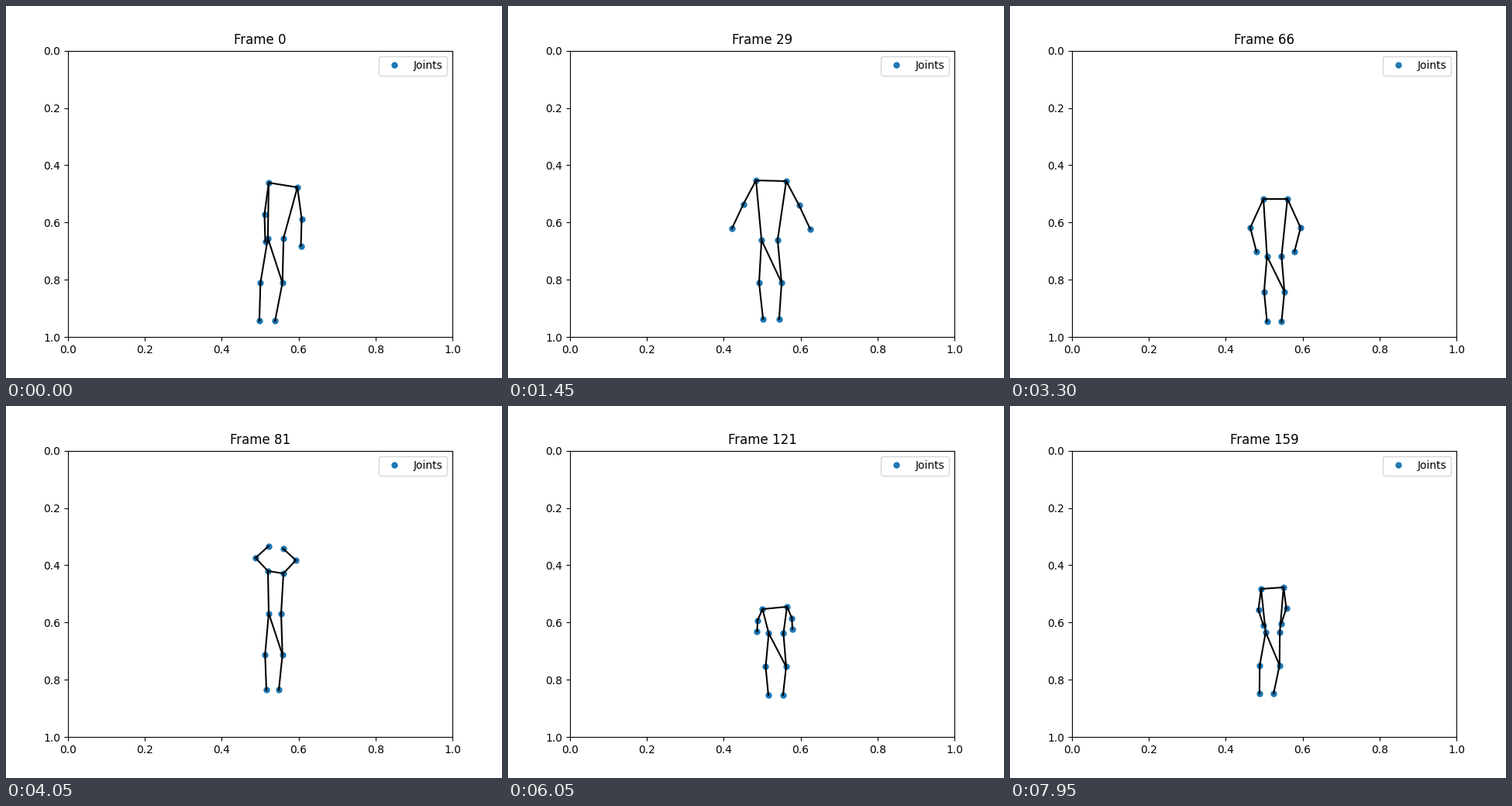
These frames come from a looping animation (640x480 px, 8000 ms). A matplotlib script:

```python
import numpy as np
import matplotlib.pyplot as plt
from matplotlib.animation import FuncAnimation

FRAMES = 160
INTERVAL = 50
TAKE_OFF, AIRBORNE, LANDING = 71, 81, 99

# Key poses in stage pixels: chest (x, y), shoulders (half width, tilt),
# elbow and wrist (outwards, down), hips (x, y), legs (lean, height of feet).
CHEST, SHOULDERS, ELBOW, WRIST, HIPS, LEGS = range(6)
KEYS = {
    0: [(357.5, 231), (18.5, 3), (5.5, 40.5), (-1, 35.5), (348, 299.5), (-5.5, 406.5)],
    29: [(339.5, 225.5), (19.5, 0.5), (16.5, 31), (14.5, 31), (337.5, 302), (1, 404)],
    50: [(342.5, 205), (15.5, 0), (9, -37.5), (-16, -31.5), (341, 297), (0, 398.5)],
    81: [(348, 214.5), (10, 1.5), (16, -17), (-16.5, -15), (347, 267.5), (-1.5, 366.5)],
    105: [(353.5, 282.5), (17.5, -2.5), (7, 6.5), (-1.5, 6), (355, 296), (-0.5, 379)],
    138: [(334, 236.5), (14, -0.5), (5.5, 23.5), (3, 23.5), (336, 290.5), (0, 366.5)],
    159: [(338.5, 235), (14.5, -1), (3.5, 27), (-6.5, 20), (339, 292), (-4, 371)],
}
TIMES = list(KEYS)

L_SH, R_SH, L_EL, R_EL, L_WR, R_WR, L_HIP, R_HIP, L_KN, R_KN, L_AN, R_AN = range(12)
BONES = [
    (L_SH, R_SH), (L_SH, L_EL), (L_EL, L_WR), (R_SH, R_EL), (R_EL, R_WR),
    (L_SH, L_HIP), (R_SH, R_HIP), (L_HIP, L_KN), (L_KN, L_AN),
    (L_HIP, R_KN), (R_HIP, R_KN), (R_KN, R_AN),
]


def ease(u):
    u = np.clip(u, 0, 1)
    return u * u * (3 - 2 * u)


def bump(i, start, end):
    u = np.clip((i - start) / (end - start), 0, 1)
    return np.sin(np.pi * u) ** 2


def body(i):
    """Body settings at step i, eased between the key poses."""
    n = min(np.searchsorted(TIMES, i, side="right"), len(TIMES) - 1)
    a, b = TIMES[n - 1], TIMES[n]
    start = max(a, TAKE_OFF) if b == AIRBORNE else a
    p, q = np.array(KEYS[a], float), np.array(KEYS[b], float)
    p += (q - p) * ease((i - start) / (b - start))

    squat = bump(i, 54, 79)
    arms = p[ELBOW:HIPS]
    arms[:, 1] *= 1 - 2 * squat
    arms[:, 0] += 6 * bump(i, 17, 29) + 6 * bump(i, 29, 44) + 8 * squat
    p[[CHEST, HIPS, LEGS], 1] += np.array([44, 26, 9]) * squat
    return p


def pair(x, y, half, tilt=0):
    return [(x - half, y - tilt), (x + half, y + tilt)]


def joints_at(i):
    (cx, cy), (half, tilt), elbow, wrist, (hx, hy), (lean, feet) = body(i)
    elbow_x, elbow_y = elbow + (half, cy)
    wrist_x, wrist_y = wrist + (elbow_x, elbow_y)
    hip = 5.5 + half / 4
    pts = np.array(
        pair(cx, cy, half, tilt)
        + pair(cx, elbow_y, elbow_x, tilt)
        + pair(cx, wrist_y, wrist_x, tilt)
        + pair(hx, hy, hip)
        + pair(hx + lean, hy + 0.54 * (feet - hy), 1.4 * hip)
        + pair(hx + 2 * lean, feet, hip)
    )

    # Backward somersault, seen from the front
    u = np.clip((i - AIRBORNE) / (LANDING - AIRBORNE), 0, 1)
    lift = np.sin(np.pi * u)
    turn = np.cos(2 * np.pi * u) * (1 - 0.3 * lift ** 2)
    pts[:, 1] = hy + (pts[:, 1] - hy) * turn - 36 * lift

    pts = (pts - (80, 57.6)) / (496, 369.6)
    if i in (85, 127):  # tracker loses a hand
        pts[L_WR] = 0
    return pts


fig, ax = plt.subplots(figsize=(6.4, 4.8), dpi=100)
ax.set_xlim(0, 1)
ax.set_ylim(1, 0)
joints, = ax.plot([], [], "o", ms=5, color="#1f77b4", label="Joints")
bones = [ax.plot([], [], "k-", lw=1.5)[0] for _ in BONES]
ax.legend(loc="upper right")
title = ax.set_title("Frame 0")


def update(i):
    pts = joints_at(i)
    joints.set_data(*pts.T)
    for line, ends in zip(bones, BONES):
        line.set_data(*pts[list(ends)].T)
    title.set_text(f"Frame {i}")
    return [joints, title, *bones]


anim = FuncAnimation(fig, update, frames=FRAMES, interval=INTERVAL,
                     repeat=True, repeat_delay=0, blit=False)
plt.show()
```
